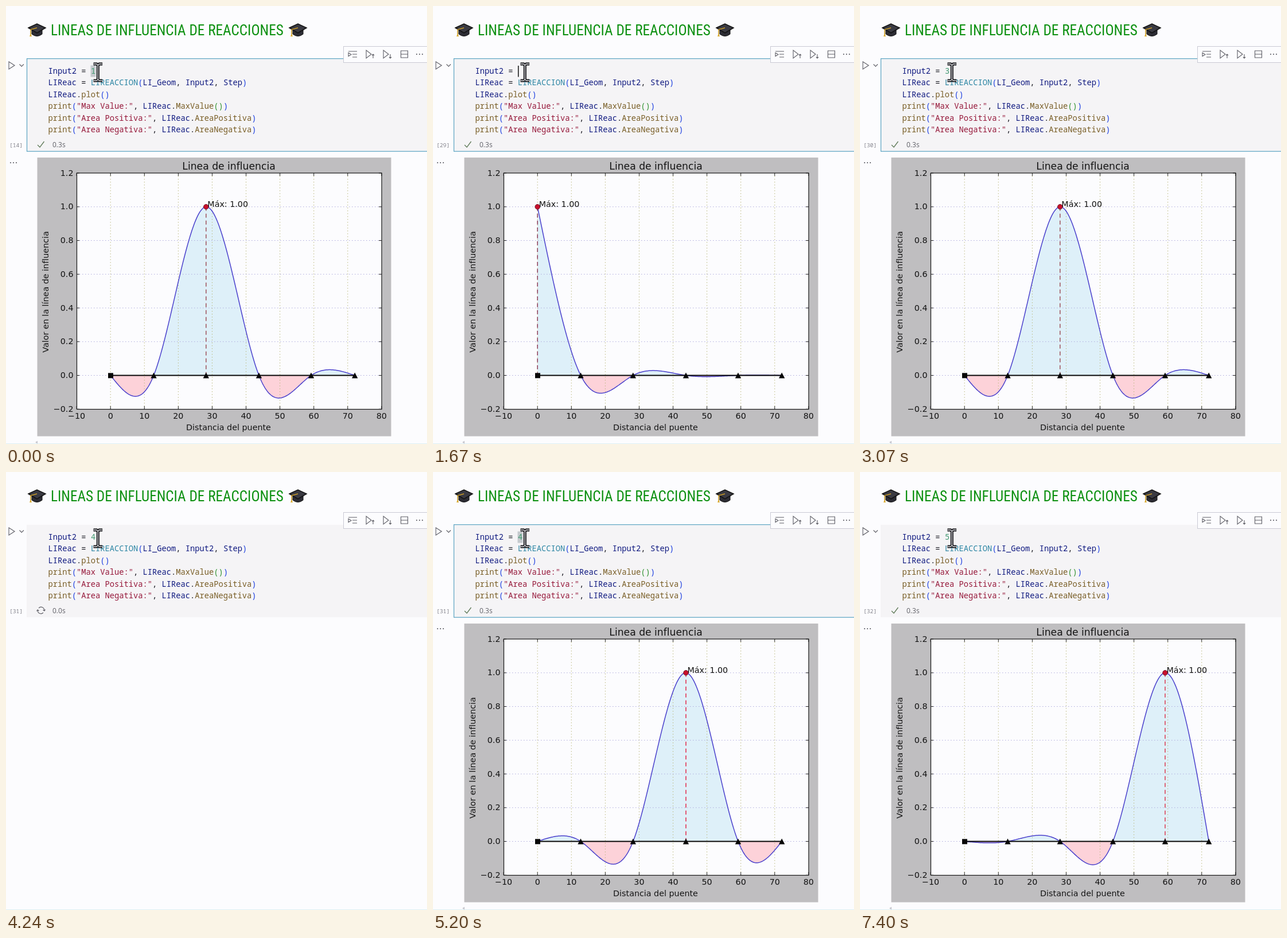
Write an HTML page that moves like this. It is 734 px wide and 763 px high and loops after 8 s.

```html
<!DOCTYPE html>
<html lang="es">
<head>
<meta charset="utf-8">
<title>Lineas de influencia</title>
<style>
  html, body { margin: 0; width: 100%; height: 100%; overflow: hidden; background: #fcfcfe; }
  svg { display: block; }
  text { white-space: pre; }
  .title { font: 25px "Roboto Condensed", Roboto, sans-serif; font-stretch: 75%; fill: #0c9010; }
  .code { font: 13.75px "Noto Sans Mono", monospace; fill: #1c1c24; }
  .count { font: 9.7px "Noto Sans Mono", monospace; fill: #83838b; }
  .time { font: 12px "Open Sans", sans-serif; fill: #616168; }
  .plot text { font: 14.3px "DejaVu Sans", sans-serif; fill: #141414; }
  .plot .head { font-size: 17.2px; }
  .icon { fill: none; stroke: #5c5c64; stroke-width: 1.1; }
  .v { fill: #101a80; } .f { fill: #795e26; } .c { fill: #2d86a4; }
  .s { fill: #96183a; } .b { fill: #1d3fe0; } .g { fill: #319331; } .n { fill: #439a72; }
</style>
</head>
<body>
<svg id="stage" width="734" height="763" viewBox="0 0 734 763"></svg>
<script>
const LOOP = 8000;
const supports = [0, 12.75, 28.2, 43.8, 59.2, 72.1];
const px = x => 182.2 + 5.908 * x;
const py = y => 643.5 - 293.7 * y;
const line = (x1, y1, x2, y2, attrs = '') =>
  `<line x1="${x1}" y1="${y1}" x2="${x2}" y2="${y2}" ${attrs}/>`;
const text = (x, y, body, attrs = '') => `<text x="${x}" y="${y}" ${attrs}>${body}</text>`;
const range = (from, to, step) =>
  Array.from({ length: Math.round((to - from) / step) + 1 }, (_, i) => from + i * step);

// Natural cubic spline through the supports: 1 at the chosen one, 0 at the others.
function influence(chosen) {
  const x = supports, last = x.length - 1;
  const y = x.map((_, i) => +(i === chosen));
  const h = i => x[i + 1] - x[i];
  const slope = i => (y[i + 1] - y[i]) / h(i);
  const up = [0], rhs = [0], m = Array(last + 1).fill(0);
  for (let i = 1; i < last; i++) {
    const pivot = 2 * (h(i - 1) + h(i)) - h(i - 1) * up[i - 1];
    up[i] = h(i) / pivot;
    rhs[i] = (6 * (slope(i) - slope(i - 1)) - h(i - 1) * rhs[i - 1]) / pivot;
  }
  for (let i = last - 1; i > 0; i--) m[i] = rhs[i] - up[i] * m[i + 1];
  return at => {
    let i = 0;
    while (i < last - 1 && at > x[i + 1]) i++;
    const a = (x[i + 1] - at) / h(i), b = 1 - a;
    return a * y[i] + b * y[i + 1] + ((a ** 3 - a) * m[i] + (b ** 3 - b) * m[i + 1]) * h(i) ** 2 / 6;
  };
}

function curve(chosen, dashColor) {
  const value = influence(chosen);
  const points = range(0, 72.1, 72.1 / 300)
    .map(x => `${px(x).toFixed(2)} ${py(value(x)).toFixed(2)}`).join('L');
  const area = `M${px(0)} ${py(0)}L${points}L${px(72.1)} ${py(0)}Z`;
  const top = px(supports[chosen]);
  return {
    fill: `<path d="${area}" fill="#def0f9" clip-path="url(#above)"/>
      <path d="${area}" fill="#fdd2d9" clip-path="url(#below)"/>`,
    stroke: `<path d="M${points}" fill="none" stroke="#4a40cc" stroke-width="1.5"/>` +
      line(top, py(1), top, py(0), `stroke="${dashColor}" stroke-width="1.4" stroke-dasharray="7 5"`),
    peak: `<circle cx="${top}" cy="${py(1)}" r="4.3" fill="#c8102c" stroke="#5c1020" stroke-width=".8"/>` +
      text(top + 2.5, 349.8, 'Máx: 1.00')
  };
}

const xTicks = range(-10, 80, 10), yTicks = range(-0.2, 1.2, 0.2);
const minus = s => s.replace('-', '−');
const grid = xTicks.slice(1, -1).map(x =>
  line(px(x), 291, px(x), 702, 'stroke="#b9b67c" stroke-dasharray="1.5 3.5"')).join('') +
  yTicks.slice(1, -1).map(y =>
    line(123, py(y), 655, py(y), 'stroke="#adaadb" stroke-dasharray="1.5 3.5"')).join('');
const ticks = '<g stroke="#222" stroke-width="1">' +
  xTicks.map(x => line(px(x), 702, px(x), 697) + line(px(x), 291, px(x), 296)).join('') +
  yTicks.map(y => line(123, py(y), 128, py(y)) + line(655, py(y), 650, py(y))).join('') + '</g>';
const labels = xTicks.map(x => text(px(x), 719, minus(String(x)), 'text-anchor="middle"')).join('') +
  yTicks.map(y => text(117.5, py(y) + 4.6, minus(y.toFixed(1)), 'text-anchor="end"')).join('');
const beam = line(px(0), py(0), px(72.1), py(0), 'stroke="#080808" stroke-width="2"') +
  '<rect x="178" y="639.3" width="9" height="9" fill="#080808"/>' +
  supports.slice(1).map(x =>
    `<path d="M${px(x)} 638.5l5.2 10h-10.4z" fill="#080808"/>`).join('');

function plot(chosen, dashColor) {
  const part = curve(chosen, dashColor);
  return `<g class="plot" data-plot="${chosen}">
    <rect x="54.5" y="264" width="617" height="485.5" fill="#bfbec0"/>
    <rect x="123" y="291" width="532" height="411" fill="#fcfcfe"/>
    ${part.fill}${grid}${part.stroke}${beam}${part.peak}
    <rect x="123.5" y="291" width="531.5" height="411.5" fill="none" stroke="#161616" stroke-width="1.2"/>
    ${ticks}${labels}
    ${text(388.5, 285, 'Linea de influencia', 'class="head" text-anchor="middle"')}
    ${text(388, 738.5, 'Distancia del puente', 'text-anchor="middle"')}
    ${text(0, 0, 'Valor en la línea de influencia',
      'text-anchor="middle" transform="translate(73.5 498) rotate(-90)"')}
  </g>`;
}

const t = (kind, body) => `<tspan class="${kind}">${body}</tspan>`;
const result = (label, member) => t('f', 'print') + t('b', '(') + t('s', `"${label}:"`) + ', ' +
  t('v', 'LIReac') + '.' + t('f', member) + t('b', ')');
const code = [
  t('v', 'Input2') + ' = ',
  t('v', 'LIReac') + ' = ' + t('c', 'LIREACCION') + t('b', '(') + t('v', 'LI_Geom') + ', ' +
    t('v', 'Input2') + ', ' + t('v', 'Step') + t('b', ')'),
  t('v', 'LIReac') + '.' + t('f', 'plot') + t('b', '()'),
  result('Max Value', 'MaxValue' + t('g', '()')),
  result('Area Positiva', 'AreaPositiva'),
  result('Area Negativa', 'AreaNegativa')
].map((body, i) => text(73.5, 118 + 20.4 * i, body, 'class="code"')).join('');

const cap = x => `<g transform="translate(${x} 41)">
  <path d="M-9 0v8q9 7 18 0v-8z" fill="#2c2c34" stroke="#111" stroke-width="1"/>
  <path d="M-15-3L0-10 15-3 0 6z" fill="#3a3a42" stroke="#111" stroke-width="1.5"/>
  <path d="M0-3L-11 0v9" fill="none" stroke="#c89a28" stroke-width="1.6"/>
  <path d="M-11 7l-2 5h4z" fill="#d8a82c"/></g>`;
const dots = (x, y, gap) => [-1, 0, 1].map(i =>
  `<circle cx="${x + i * gap}" cy="${y}" r="1.1" fill="#5c5c64"/>`).join('');

const toolbar = `<rect x="588.5" y="70.5" width="160" height="28" fill="#fcfcfe" stroke="#c9c9d4"/>
  <g class="icon">
    <path d="M597 79h15M604 84h8M604 89h8M597 81.500v6l5-3z"/>
    <path d="M628 77v14l9-7zM640 91v-7m-2 2l2-2 2 2"/>
    <path d="M658 77v14l9-7zM670 84v7m-2-2l2 2 2-2"/>
    <path d="M688.500 78h12v12h-12zM688.500 84h12"/>
  </g>${dots(721, 84, 5)}`;

const stage = document.getElementById('stage');
stage.innerHTML = `
  <clipPath id="above"><rect x="123" y="291" width="532" height="${py(0) - 291}"/></clipPath>
  <clipPath id="below"><rect x="123" y="${py(0)}" width="532" height="59"/></clipPath>
  <rect width="734" height="763" fill="#fcfcfe"/>
  ${cap(54)}${cap(509)}
  ${text(78, 51, 'LINEAS DE INFLUENCIA DE REACCIONES', 'id="title" class="title"')}
  <rect x="36" y="92" width="700" height="161" fill="#f5f4f6"/>
  <rect id="focus" x="36.5" y="91.700" width="710" height="161.500" fill="none" stroke="#5aa3c2" stroke-width="1.2"/>
  <path class="icon" d="M5 97v13l10-6.500z"/>
  <path class="icon" d="M23.500 101.500l3.700 3.700 3.700-3.700"/>
  <rect id="selection" x="147.500" y="103.500" width="9" height="20" fill="#c5cace"/>
  ${code}${text(148, 118, '', 'id="digit" class="code n"')}
  <rect id="caret" y="104" width="1.500" height="19.500" fill="#111"/>
  ${text(6, 245.500, '', 'id="count" class="count"')}
  <path id="check" class="icon" d="M55 242l4 4 7.500-10" style="stroke:#5f7a58;stroke-width:1.300"/>
  <g id="spinner" class="icon"><path d="M-5.500-1A5.500 5.500 0 0 1 5-2.500M5.500 1A5.500 5.500 0 0 1-5 2.500M5.500-5.500v3h-3M-5.500 5.500v-3h3"/></g>
  ${text(81, 246, '', 'id="time" class="time"')}
  ${toolbar}
  <g id="output">${dots(13, 273, 5)}
    <path d="M55 757.500l-4 2.500 4 2.500z" fill="#c4c4cc"/>
    ${plot(0, '#853050')}${plot(2, '#994650')}${plot(3, '#e4183c')}${plot(4, '#da2c44')}
  </g>
  ${line(0, 762.5, 734, 762.5, 'stroke="#dceff4"')}
  <g fill="none"><path id="pointer" d="M152.500 101h5.500l2.300 2 2.300-2h5.500M152.500 130h5.500l2.300-2 2.300 2h5.500M160.300 102v27" stroke="#101014" stroke-width="5"/>
    <path d="M153 101h5l2.300 2 2.300-2h5M153 130h5l2.300-2 2.300 2h5M160.300 102v27" stroke="#dcdce0" stroke-width="1.400"/></g>`;

const el = id => document.getElementById(id);
const show = (node, on) => { node.style.display = on ? '' : 'none'; };
const title = el('title');
title.style.fontSize = 25 * 406 / title.getComputedTextLength() + 'px';

const BEFORE = 148, AFTER = 156;
const run = (start, end, count, chosen) => [
  [start, { focus: false, selected: false, caret: 0, count, started: start }],
  [start + 120, { plot: -1 }],
  [end - 150, { plot: chosen }],
  [end - 60, { started: -1 }]
];
const steps = [
  [0, { digit: '1', selected: true, focus: true, caret: 0, count: 14, plot: 2, started: -1 }],
  ...run(240, 1040, 29, 0),
  [1100, { focus: true }],
  [1300, { selected: true }],
  [1570, { digit: '', selected: false, caret: BEFORE }],
  [1840, { digit: '3', caret: AFTER }],
  ...run(2040, 2840, 30, 2),
  [2900, { focus: true }],
  [3240, { selected: true }],
  [3500, { digit: '', selected: false, caret: BEFORE }],
  [3770, { digit: '4', caret: AFTER }],
  ...run(4100, 4740, 31, 3),
  [4930, { focus: true }],
  [5130, { selected: true }],
  [5400, { digit: '', selected: false, caret: BEFORE }],
  [5700, { digit: '5', caret: AFTER }],
  [6100, { caret: 0 }],
  [6570, { caret: AFTER }],
  ...run(6770, 7400, 32, 4)
];

const plots = [...document.querySelectorAll('[data-plot]')];
function draw(now) {
  const state = {};
  for (const [at, change] of steps) if (at <= now) Object.assign(state, change);
  const running = state.started >= 0;
  const elapsed = now - state.started;
  const tenths = running ? Math.min(3, Math.floor(Math.max(0, elapsed - 100) / 100)) : 3;

  el('digit').textContent = state.digit;
  el('count').textContent = `[${state.count}]`;
  el('time').textContent = `0.${tenths}s`;
  el('caret').setAttribute('x', state.caret);
  el('spinner').setAttribute('transform', `translate(61 241) rotate(${running ? elapsed * 0.24 : 0})`);
  show(el('caret'), state.caret);
  show(el('focus'), state.focus);
  show(el('selection'), state.selected);
  show(el('spinner'), running);
  show(el('check'), !running);
  show(el('output'), state.plot >= 0);
  for (const p of plots) show(p, +p.dataset.plot === state.plot);
}

const origin = performance.now();
function tick() {
  draw((performance.now() - origin) % LOOP);
  requestAnimationFrame(tick);
}
tick();
</script>
</body>
</html>
```
